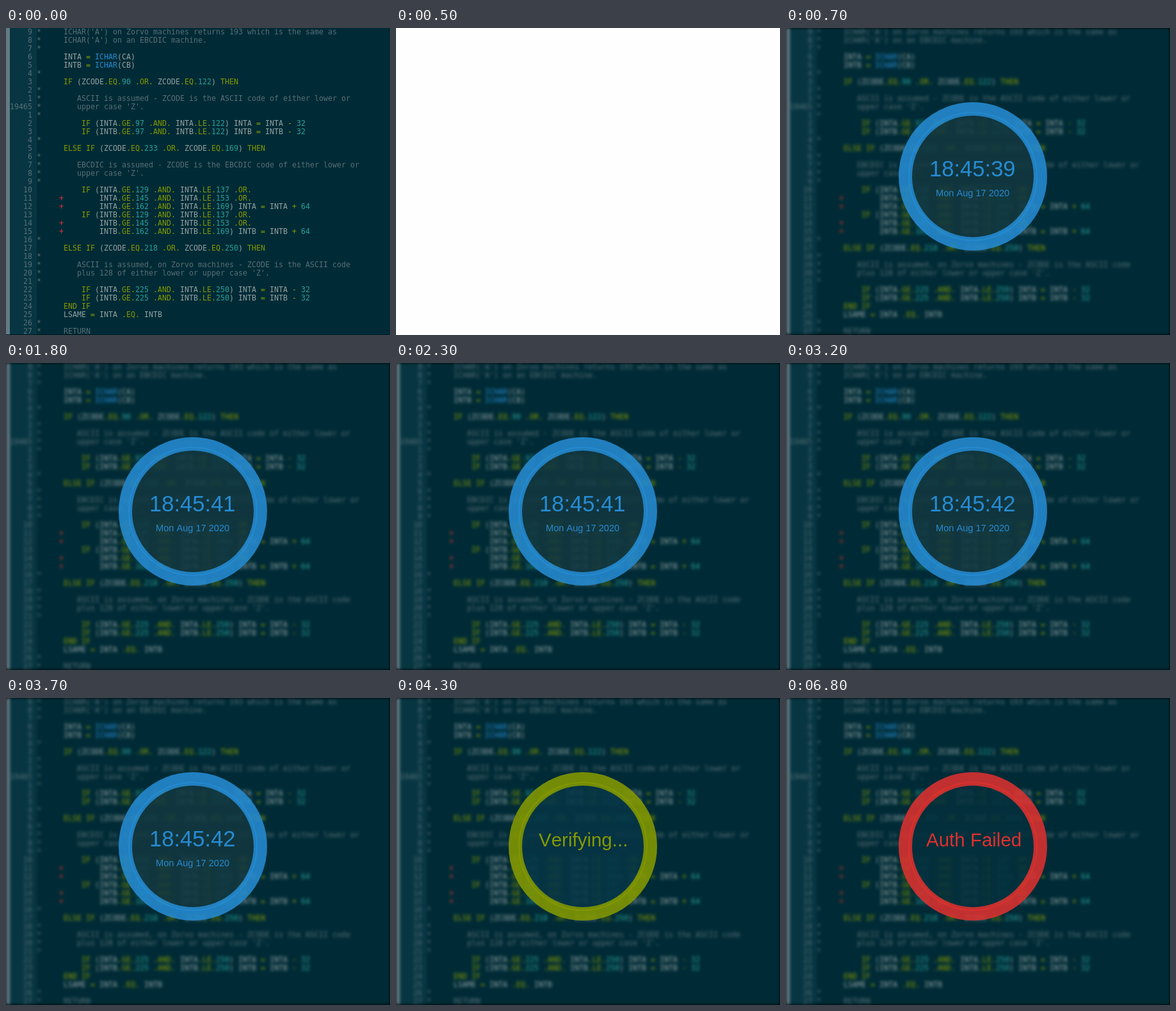
These frames come from a looping animation (600x480 px, 8 s). An HTML page with a canvas:

```html
<!DOCTYPE html>
<html lang="en">
<head>
<meta charset="utf-8">
<title>Screen lock</title>
<style>
html, body { margin: 0; width: 600px; height: 480px; overflow: hidden; background: #000; }
canvas { display: block; }
</style>
</head>
<body>
<canvas id="stage" width="600" height="480"></canvas>
<script>
const W = 600, H = 480, LOOP = 8000;
const COL = 7, ROW = 13, TEXT_X = 48, CURRENT = 9;
const CX = 292, CY = 232;
const BLUE = '#268bd2', GREEN = '#859900', RED = '#dc322f', CYAN = '#2aa198';
const PLAIN = '#93a1a1', DIM = '#586e75';

const CODE = `
*     ICHAR('A') on Zorvo machines returns 193 which is the same as
*     ICHAR('A') on an EBCDIC machine.
*
      INTA = ICHAR(CA)
      INTB = ICHAR(CB)
*
      IF (ZCODE.EQ.90 .OR. ZCODE.EQ.122) THEN
*
*        ASCII is assumed - ZCODE is the ASCII code of either lower or
*        upper case 'Z'.
*
          IF (INTA.GE.97 .AND. INTA.LE.122) INTA = INTA - 32
          IF (INTB.GE.97 .AND. INTB.LE.122) INTB = INTB - 32
*
      ELSE IF (ZCODE.EQ.233 .OR. ZCODE.EQ.169) THEN
*
*        EBCDIC is assumed - ZCODE is the EBCDIC code of either lower or
*        upper case 'Z'.
*
          IF (INTA.GE.129 .AND. INTA.LE.137 .OR.
     +        INTA.GE.145 .AND. INTA.LE.153 .OR.
     +        INTA.GE.162 .AND. INTA.LE.169) INTA = INTA + 64
          IF (INTB.GE.129 .AND. INTB.LE.137 .OR.
     +        INTB.GE.145 .AND. INTB.LE.153 .OR.
     +        INTB.GE.162 .AND. INTB.LE.169) INTB = INTB + 64
*
      ELSE IF (ZCODE.EQ.218 .OR. ZCODE.EQ.250) THEN
*
*        ASCII is assumed, on Zorvo machines - ZCODE is the ASCII code
*        plus 128 of either lower or upper case 'Z'.
*
          IF (INTA.GE.225 .AND. INTA.LE.250) INTA = INTA - 32
          IF (INTB.GE.225 .AND. INTB.LE.250) INTB = INTB - 32
      END IF
      LSAME = INTA .EQ. INTB
*
*     RETURN`.slice(1).split('\n');

// Key flashes on the ring: start ms, end ms, start angle in degrees
const KEYS = [[2000, 2300, 273], [2500, 2800, 182], [3000, 3200, 143.6], [3500, 3700, 95.7]];
const TICKS = [800, 1800, 2900, 4000];

function layer(draw) {
  const canvas = document.createElement('canvas');
  canvas.width = W;
  canvas.height = H;
  draw(canvas.getContext('2d'));
  return canvas;
}

function tokenColor(token, col) {
  if (token === '+' && col === 5) return RED;
  if (token === 'ICHAR') return BLUE;
  if (/^\d/.test(token)) return CYAN;
  if (/^(\.|IF|ELSE|END|THEN|[-+=])/.test(token)) return GREEN;
  return PLAIN;
}

const editor = layer(g => {
  const rect = (color, x, y, w, h) => { g.fillStyle = color; g.fillRect(x, y, w, h); };
  const put = (text, color, x, y) => { g.fillStyle = color; g.fillText(text, x, y); };
  rect('#002b36', 0, 0, W, H);
  rect('#073642', 6, 0, 42, H);
  rect('#657b83', 0, 0, 6, H);
  g.font = '11.63px "DejaVu Sans Mono", monospace';
  CODE.forEach((line, i) => {
    const y = 10 + i * ROW;
    const number = String(i === CURRENT ? 19465 : Math.abs(i - CURRENT));
    put(number, DIM, 41 - number.length * COL, y);
    if (line[0] === '*') return put(line, DIM, TEXT_X, y);
    for (const { 0: token, index } of line.matchAll(/\.[A-Z]+\.|\w+|\S/g))
      put(token, tokenColor(token, index), TEXT_X + index * COL, y);
  });
  rect('#001a22', 0, H - 1, W, 1);
});

const backdrop = layer(g => {
  g.fillStyle = '#000';
  g.fillRect(0, 0, W, H);
  g.filter = 'blur(2px)';
  g.drawImage(editor, 0, 0);
});

const ctx = document.getElementById('stage').getContext('2d');
ctx.fontKerning = 'none';

function arc(radius, width, color, from = 0, sweep = 360) {
  const rad = Math.PI / 180;
  ctx.beginPath();
  ctx.arc(CX, CY, radius, from * rad, (from + sweep) * rad);
  ctx.lineWidth = width;
  ctx.strokeStyle = color;
  ctx.stroke();
}

function label(text, size, x, y, color) {
  ctx.font = size + 'px "Liberation Sans", Arial, sans-serif';
  ctx.fillStyle = color;
  ctx.fillText(text, x, y);
}

function ring(color, inside) {
  ctx.fillStyle = inside;
  ctx.beginPath();
  ctx.arc(CX, CY, 96, 0, 7);
  ctx.fill();
  ctx.globalAlpha = 0.88;
  arc(105.5, 21, color);
  arc(100, 2, color);
  ctx.globalAlpha = 1;
}

function lockScreen(t) {
  ctx.drawImage(backdrop, 0, 0);
  if (t >= 6800) {
    ring(RED, 'rgba(4,47,60,.85)');
    label('Auth Failed', 29.5, 219, 232, RED);
  } else if (t >= 4300) {
    ring(GREEN, 'rgba(6,53,70,.85)');
    label('Verifying...', 29.5, 223, 232, GREEN);
  } else {
    ring(BLUE, 'rgba(19,56,64,.85)');
    const seconds = 39 + TICKS.filter(tick => t >= tick).length;
    label('18:45:' + seconds, 34.6, 224, 232, BLUE);
    label('Mon Aug 17 2020', 14.6, 234, 263, BLUE);
    for (const [start, end, angle] of KEYS)
      if (t >= start && t < end) arc(105.5, 21, GREEN, angle, 60.3);
  }
}

function render(t) {
  if (t < 500) {
    ctx.drawImage(editor, 0, 0);
  } else if (t < 700) {
    ctx.fillStyle = '#fefefe';
    ctx.fillRect(0, 0, W, H);
  } else {
    lockScreen(t);
  }
}

const begin = performance.now();
function frame() {
  render((performance.now() - begin) % LOOP);
  requestAnimationFrame(frame);
}
frame();
</script>
</body>
</html>
```
